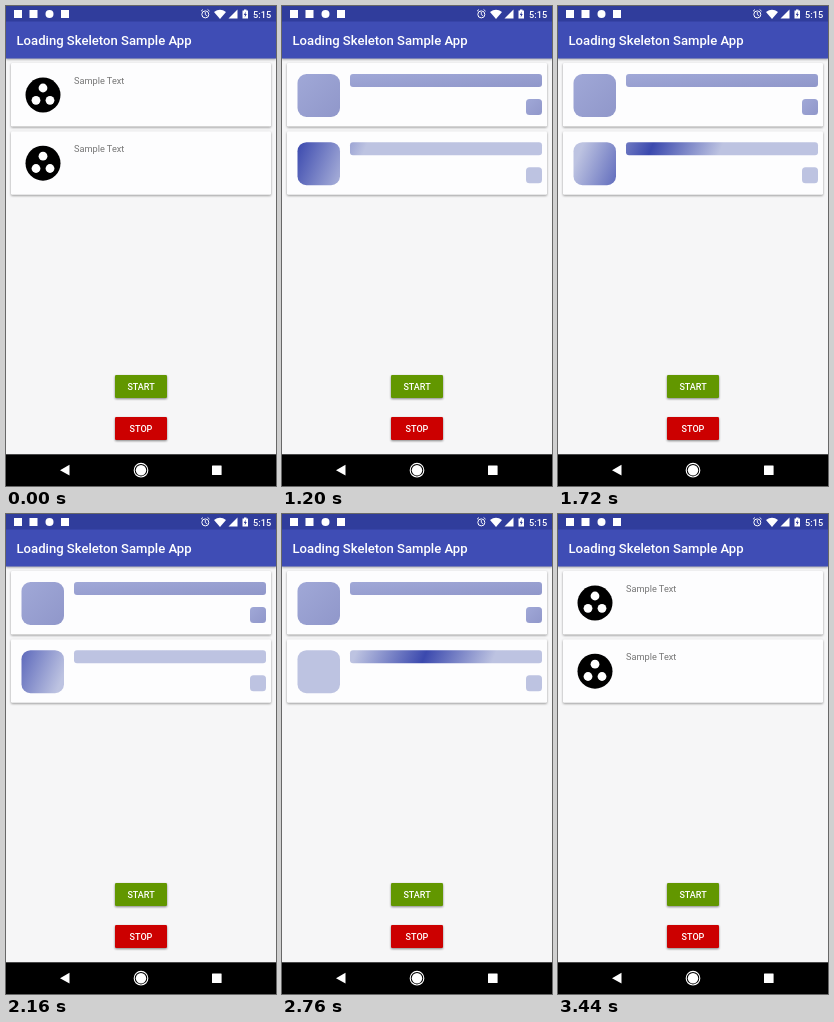
An HTML page that plays this animation: 270 by 480 pixels, repeating every 3600 ms.

```html
<!DOCTYPE html>
<html lang="en">
<head>
<meta charset="utf-8">
<title>Loading skeleton</title>
<style>
  html, body { margin: 0; width: 100%; height: 100%; overflow: hidden; background: #f6f6f7; }
  svg { display: block; width: 100vw; height: 100vh; }
  text { font: 500 9.2px Roboto, sans-serif; fill: #fff; }
  .title { font-size: 13.1px; }
  .label { font-weight: 400; fill: #757575; }
  .button { text-anchor: middle; font-size: 9px; }
  .card { fill: #fdfdfe; filter: drop-shadow(0 1px 1px #0006); }
  .raised { filter: drop-shadow(0 1px .8px #0007); }
</style>
</head>
<body>
<svg viewBox="0 0 270 480">
  <defs>
    <linearGradient id="still" x1="0" y1="0" x2="1" y2="1">
      <stop stop-color="#a0a8d7"/><stop offset="1" stop-color="#9097ca"/>
    </linearGradient>
    <linearGradient id="shimmer" gradientUnits="userSpaceOnUse" x1="-70" y1="142" x2="50.7" y2="190.3">
      <stop stop-color="#bdc3e1"/><stop offset=".5" stop-color="#3b49ae"/><stop offset="1" stop-color="#bdc3e1"/>
    </linearGradient>
    <clipPath id="startClip"><rect x="109" y="369" width="52" height="23" rx="1.3"/></clipPath>
    <clipPath id="stopClip"><rect x="109" y="411" width="52" height="23" rx="1.3"/></clipPath>
    <g id="content">
      <circle cx="37" cy="89" r="17.5"/>
      <g fill="#fff">
        <circle cx="37" cy="82" r="4.4"/><circle cx="30" cy="94.3" r="4.4"/><circle cx="44" cy="94.3" r="4.4"/>
      </g>
      <text class="label" x="68" y="78">Sample Text</text>
    </g>
  </defs>

  <rect width="270" height="480" fill="#f6f6f7"/>
  <rect y="15" width="270" height="37.5" fill="#3f4db5" style="filter:drop-shadow(0 1px 1px #0005)"/>
  <rect width="270" height="15.5" fill="#303d9c"/>
  <text class="title" x="10.5" y="39">Loading Skeleton Sample App</text>

  <!-- status bar -->
  <g fill="#fff">
    <rect x="8" y="4" width="8" height="8"/>
    <rect x="23.5" y="4" width="8" height="8"/>
    <circle cx="43.5" cy="8" r="4"/>
    <rect x="55" y="4" width="8" height="8"/>
    <path d="M208 6Q214 1.6 220 6L214 13Z"/>
    <path d="M231.5 3.5V12.5H222.5Z"/>
    <path d="M236.5 4.5H238V3.5H240.5V4.5H242V12.5H236.5Z"/>
    <path d="M239.8 5.5L237.8 9H239L238.7 11.5L240.8 8H239.5Z" fill="#303d9c"/>
  </g>
  <g fill="none" stroke="#fff">
    <circle cx="199.3" cy="8.4" r="3.5"/>
    <path d="M199.3 6V8.6L201 9.7M195 5.2L197 3.5M201.6 3.5L203.6 5.2" stroke-width=".9"/>
  </g>
  <text x="247" y="11.5">5:15</text>

  <rect class="card" x="5" y="57" width="260" height="63.5" rx="1.3"/>
  <rect class="card" x="5" y="125.3" width="260" height="63.5" rx="1.3"/>
  <g id="loaded">
    <use href="#content"/>
    <use href="#content" y="68.2"/>
  </g>
  <g id="skeleton"></g>

  <rect class="raised" x="109" y="369" width="52" height="23" rx="1.3" fill="#629700"/>
  <rect class="raised" x="109" y="411" width="52" height="23" rx="1.3" fill="#cc0000"/>
  <g fill="#fff">
    <circle id="startRipple" cx="135" cy="380.5" clip-path="url(#startClip)"/>
    <circle id="stopRipple" cx="135" cy="422.5" clip-path="url(#stopClip)"/>
  </g>
  <text class="button" x="135" y="383.8">START</text>
  <text class="button" x="135" y="425.8">STOP</text>

  <!-- navigation bar -->
  <rect y="448.3" width="270" height="31.7"/>
  <g fill="#fff">
    <path d="M54 464.2L63.5 458.8V469.6Z"/>
    <circle cx="135" cy="464.2" r="5.2"/>
    <circle cx="135" cy="464.2" r="6.8" fill="none" stroke="#fff" stroke-width="1.1"/>
    <rect x="206" y="459.5" width="9.6" height="9.6" rx=".5"/>
  </g>
</svg>
<script>
  const LOOP = 3600, STEP = 40;
  const SHOW = 1160, HIDE = 3360;
  const SWEEPS = [1185, 1640, 2160, 2640, 3120];
  const SPEED = 1.23;
  const el = id => document.getElementById(id);

  const bones = (dy, fill) => [[15.5, 68, 42.5, 43, 9], [68, 68, 192, 13, 3], [244, 93, 16, 16, 3.5]]
    .map(([x, y, w, h, r]) =>
      `<rect x="${x}" y="${y + dy}" width="${w}" height="${h}" rx="${r}" fill="url(#${fill})"/>`)
    .join('');
  el('skeleton').innerHTML = bones(0, 'still') + bones(68.2, 'shimmer');

  function ripple(id, age) {
    const p = age / 240;
    const on = p > 0 && p < 1;
    el(id).setAttribute('r', on ? 28 * p : 0);
    el(id).setAttribute('opacity', on ? .25 * (1 - p) : 0);
  }

  function draw(now) {
    const t = Math.floor(now % LOOP / STEP) * STEP;
    const loading = t >= SHOW && t < HIDE;
    el('loaded').style.display = loading ? 'none' : '';
    el('skeleton').style.display = loading ? '' : 'none';

    const start = SWEEPS.filter(s => s <= t).pop();
    const x = start === undefined ? -100 : -5 + SPEED * (t - start);
    el('shimmer').setAttribute('gradientTransform', `translate(${x} 0)`);

    ripple('startRipple', t - 920);
    ripple('stopRipple', t - 3200);
  }

  const origin = performance.now();
  function tick() {
    draw(performance.now() - origin);
    requestAnimationFrame(tick);
  }
  tick();
</script>
</body>
</html>
```
